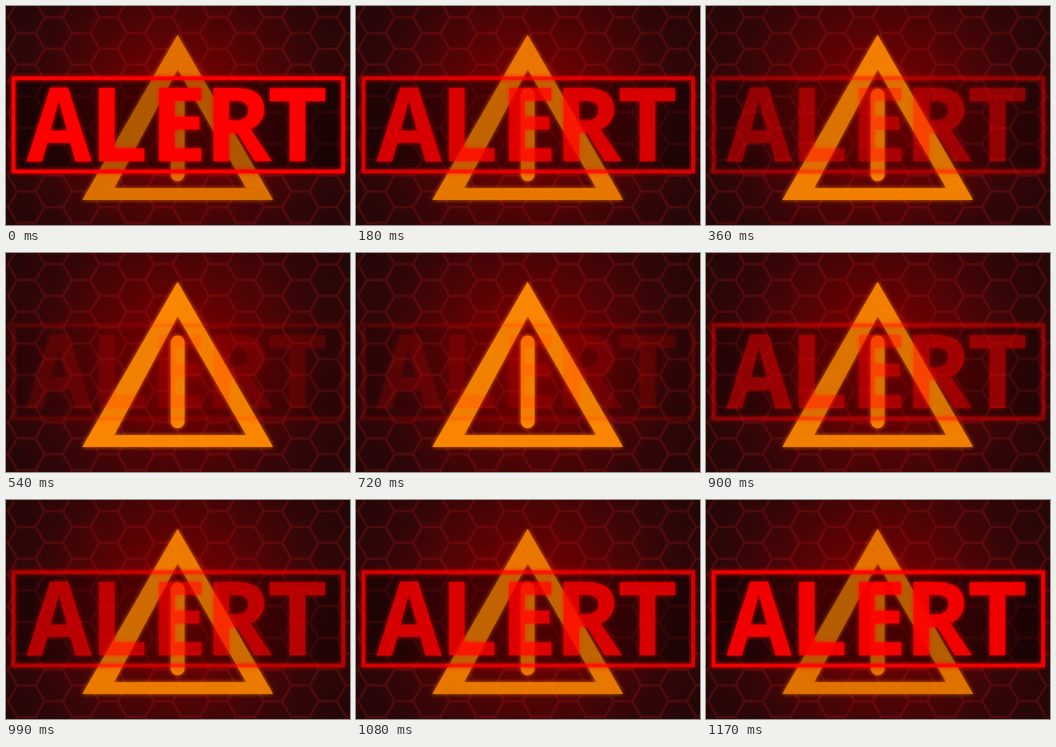
An HTML page for the animation above (1260 ms loop, 550 by 350 pixels).

```html
<!DOCTYPE html>
<html lang="en">
<head>
<meta charset="utf-8">
<title>Alert</title>
<style>
  html, body {
    margin: 0;
    width: 100%;
    height: 100%;
    overflow: hidden;
    background: #2a0606;
  }
  svg { display: block; width: 100vw; height: 100vh; }

  .sign, .alert { animation: 1260ms step-end infinite; }
  .sign { animation-name: sign; fill: #ff8a00; }
  .alert { animation-name: alert; }

  .letters {
    font: 700 164px "Open Sans", "Noto Sans", sans-serif;
    fill: #f00;
  }
  .narrow {
    font: 700 158px "Noto Sans CJK JP", "Noto Sans CJK SC", "Open Sans", sans-serif;
    stroke: #f00;
    stroke-width: 1;
  }

  /* 14 steps of 90 ms, fading out and back */
  @keyframes alert {
    0%, 100% { opacity: 1; }
    7.1428%, 92.857% { opacity: .93; }
    14.2857%, 85.714% { opacity: .8; }
    21.4285%, 78.571% { opacity: .64; }
    28.5714%, 71.428% { opacity: .46; }
    35.7142%, 64.285% { opacity: .25; }
    42.8571%, 57.142% { opacity: .16; }
    50% { opacity: .12; }
  }
  @keyframes sign {
    0%, 100% { opacity: .8; }
    7.1428%, 92.857% { opacity: .82; }
    14.2857%, 85.714% { opacity: .86; }
    21.4285%, 78.571% { opacity: .89; }
    28.5714%, 71.428% { opacity: .92; }
    35.7142%, 64.285% { opacity: .95; }
    42.8571%, 57.142% { opacity: .97; }
    50% { opacity: .98; }
  }
</style>
</head>
<body>
<svg viewBox="0 0 550 350" preserveAspectRatio="none">
  <defs>
    <radialGradient id="back" gradientUnits="userSpaceOnUse" cx="275" cy="172" r="315">
      <stop offset="0" stop-color="#8a0000"/>
      <stop offset=".25" stop-color="#6c0002"/>
      <stop offset=".5" stop-color="#4e0406"/>
      <stop offset=".75" stop-color="#320608"/>
      <stop offset="1" stop-color="#240707"/>
    </radialGradient>
    <pattern id="hex" patternUnits="userSpaceOnUse" x="18" y="43.2" width="87.6" height="50.6">
      <path d="M0 0H29.2L43.8 25.3H73L87.6 0M43.8 25.3L29.2 50.6H0M73 25.3L87.6 50.6"
            fill="none" stroke="#d01822" stroke-width="4" stroke-opacity=".19"/>
    </pattern>
    <filter id="glow" filterUnits="userSpaceOnUse" x="0" y="0" width="550" height="350">
      <feGaussianBlur stdDeviation="3.5" result="blur"/>
      <feComponentTransfer in="blur" result="soft">
        <feFuncA type="linear" slope=".85"/>
      </feComponentTransfer>
      <feMerge>
        <feMergeNode in="soft"/>
        <feMergeNode in="SourceGraphic"/>
      </feMerge>
    </filter>
  </defs>

  <rect width="550" height="350" fill="url(#back)"/>
  <rect width="550" height="350" fill="url(#hex)"/>
  <rect class="alert" x="12" y="115" width="527" height="150" fill-opacity=".3"/>

  <g class="sign">
    <g filter="url(#glow)">
      <path fill-rule="evenodd" d="M274.3 46L427 310H122ZM274.5 101L173 291H384Z"/>
      <rect x="263.5" y="132" width="22" height="148" rx="11"/>
    </g>
  </g>

  <g class="alert">
    <rect x="12" y="115" width="527" height="150" fill-opacity=".2"/>
    <g filter="url(#glow)">
      <rect x="12" y="115.5" width="527" height="149" fill="none" stroke="#f00" stroke-width="6"/>
      <text class="letters" y="248"><tspan class="narrow" x="85" text-anchor="middle">A</tspan><tspan x="134">L</tspan><tspan x="230">E</tspan><tspan x="317">R</tspan><tspan x="466" text-anchor="middle">T</tspan></text>
    </g>
  </g>
</svg>
</body>
</html>
```
